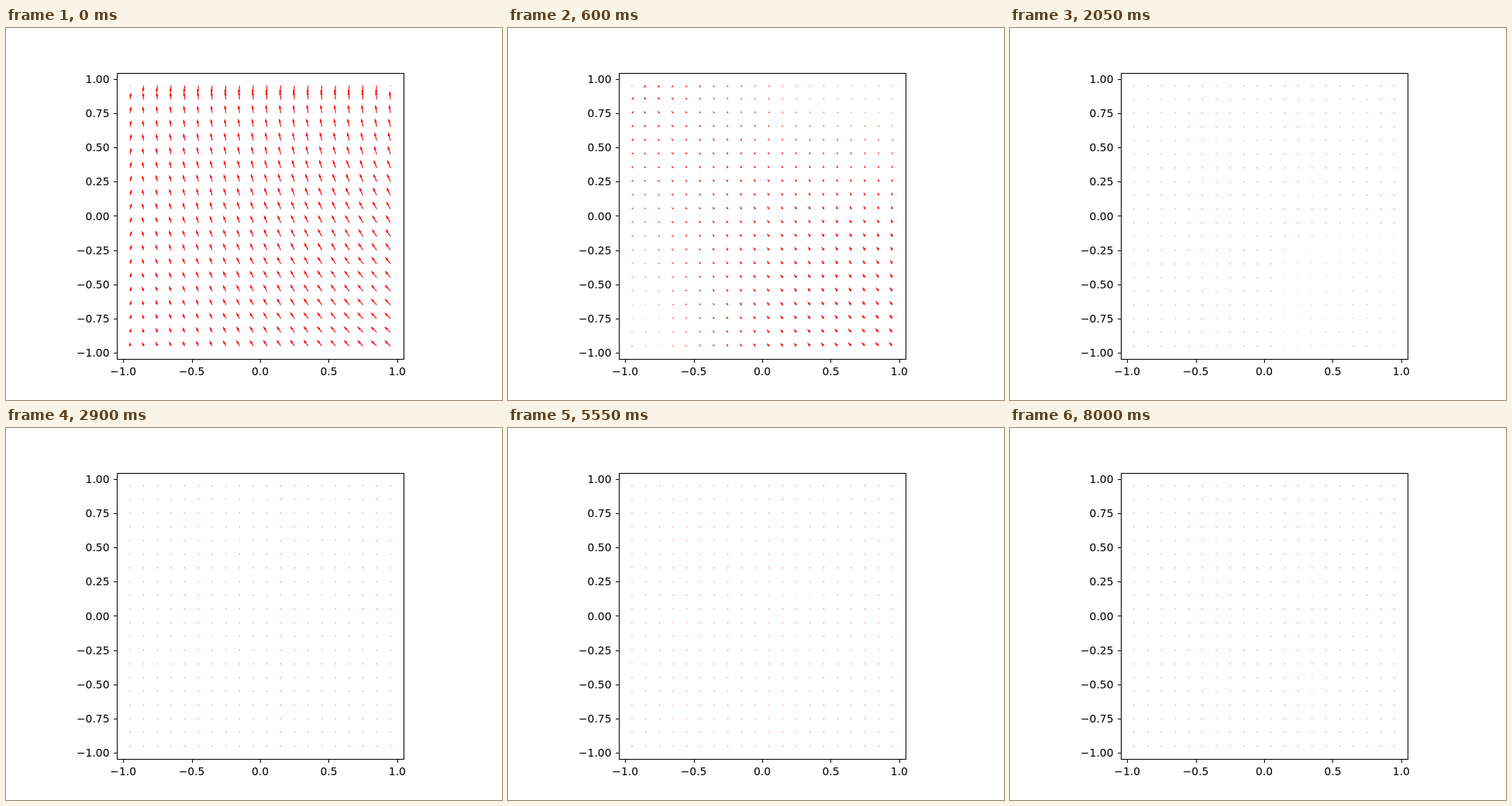
Recreate the animation shown at these times as an HTML page with a canvas. Size 640 by 480 pixels, loop 8050 ms.

```html
<!DOCTYPE html>
<html>
<head>
<meta charset="utf-8">
<style>
html, body { margin: 0; width: 640px; height: 480px; overflow: hidden; background: #fff; }
canvas { display: block; }
</style>
</head>
<body>
<canvas id="stage" width="640" height="480"></canvas>
<script>
const ctx = document.getElementById('stage').getContext('2d');
const LOOP = 8050, STEP = 50, N = 20;
const UNIT = 369.6 / 2.09;      // pixels per axis unit
const SHAFT = 369.6 * 0.003;    // arrow shaft width
const DECAY = 930;              // ms
const px = x => 328 + x * UNIT;
const py = y => 242.4 - y * UNIT;

// Velocity in pixels on a 3x3 lattice (top row first) at three times.
const KEYS = [
  { t: 0,
    u: [-1.2, -1.2, -1, -2.4, -4, -5.8, -2, -5, -8],
    v: [9, 11, 11, 7.8, 10, 10, 5.4, 8.2, 7.6] },
  { t: 200,
    u: [-4, -0.9, 2.4, -3, -3.8, -3.1, -1.4, -4.3, -6.3],
    v: [5.2, 5.6, 3.8, 5.2, 6.6, 7.4, 3.2, 6, 6.4] },
  { t: 600,
    u: [-2.9, -0.6, 1.3, -1.9, -2.7, -2, -0.5, -3.1, -4.8],
    v: [3, 2.4, 1, 2, 3.7, 4.6, 0.8, 3.8, 5.4] }
];

// Quadratic weights for nodes at 0.85, 0, -0.85 of the given coordinate.
function weights(c) {
  const s = c / 0.85;
  return [s * (s + 1) / 2, 1 - s * s, s * (s - 1) / 2];
}

// Blend the keys with the common exponential decay factored out.
function latticeAt(t) {
  const i = t < 200 ? 0 : 1, a = KEYS[i], b = KEYS[i + 1];
  const k = Math.min(1, (t - a.t) / (b.t - a.t));
  const wa = (1 - k) * Math.exp((a.t - t) / DECAY);
  const wb = k * Math.exp((b.t - t) / DECAY);
  const mix = name => a[name].map((p, j) => p * wa + b[name][j] * wb);
  return { u: mix('u'), v: mix('v') };
}

const coord = i => -0.95 + i * 0.1;
const inner = i => Math.max(1, Math.min(N - 2, i));

function velocity(lattice, i, j) {
  const wx = weights(-coord(inner(i))), wy = weights(coord(inner(j)));
  let u = 0, v = 0;
  for (let r = 0; r < 3; r++) {
    for (let c = 0; c < 3; c++) {
      const w = wy[r] * wx[c];
      u += w * lattice.u[r * 3 + c];
      v += w * lattice.v[r * 3 + c];
    }
  }
  // The walls push the flow back inwards.
  const side = i === 0 || i === N - 1;
  if (i === 0) u = Math.abs(u);
  if (i === N - 1) u = -Math.abs(u);
  if (j === 0) v = Math.abs(v);
  if (j === N - 1) v = -Math.abs(v);
  if (side && j === N - 1) return [0, 0];
  if (i === 0 && j === 0) return [0, v];
  return [u, v];
}

function arrowShape(len) {
  if (len < 1) {
    return Array.from({ length: 6 }, (_, k) =>
      [Math.cos(k * Math.PI / 3) / 2, Math.sin(k * Math.PI / 3) / 2]);
  }
  const L = Math.max(len, 5), s = Math.min(1, len / 5);
  const half = [[0, 0.5], [L - 4.5, 0.5], [L - 5, 1.5]];
  const mirrored = half.map(([x, y]) => [x, -y]).reverse();
  return [...half, [L, 0], ...mirrored].map(([x, y]) => [x * s, y * s]);
}

function drawArrow(x, y, u, v) {
  const len = Math.hypot(u, v) / SHAFT, angle = Math.atan2(-v, u);
  const c = Math.cos(angle) * SHAFT, s = Math.sin(angle) * SHAFT;
  ctx.beginPath();
  for (const [a, b] of arrowShape(len)) ctx.lineTo(x + a * c - b * s, y + a * s + b * c);
  ctx.fill();
}

function drawAxes() {
  const label = (n, digits) => n.toFixed(digits).replace('-', '\u2212');
  ctx.fillStyle = '#000';
  ctx.font = '13.889px "DejaVu Sans", sans-serif';
  ctx.fillRect(143, 58, 371, 1);
  ctx.fillRect(143, 427, 371, 1);
  ctx.fillRect(143, 58, 1, 370);
  ctx.fillRect(513, 58, 1, 370);
  ctx.textAlign = 'center';
  for (let n = -1; n <= 1; n += 0.5) {
    ctx.fillRect(Math.round(px(n)), 428, 1, 4);
    ctx.fillText(label(n, 1), px(n), 448);
  }
  ctx.textAlign = 'right';
  for (let n = -1; n <= 1; n += 0.25) {
    ctx.fillRect(139, Math.round(py(n)), 4, 1);
    ctx.fillText(label(n, 2), 133.5, Math.round(py(n) + 5.1));
  }
}

function frame() {
  const t = Math.floor(performance.now() % LOOP / STEP) * STEP;
  const lattice = latticeAt(t);
  ctx.fillStyle = '#fff';
  ctx.fillRect(0, 0, 640, 480);
  ctx.fillStyle = '#f00';
  for (let j = 0; j < N; j++) {
    for (let i = 0; i < N; i++) {
      drawArrow(px(coord(i)), py(coord(j)), ...velocity(lattice, i, j));
    }
  }
  drawAxes();
  requestAnimationFrame(frame);
}
frame();
</script>
</body>
</html>
```
